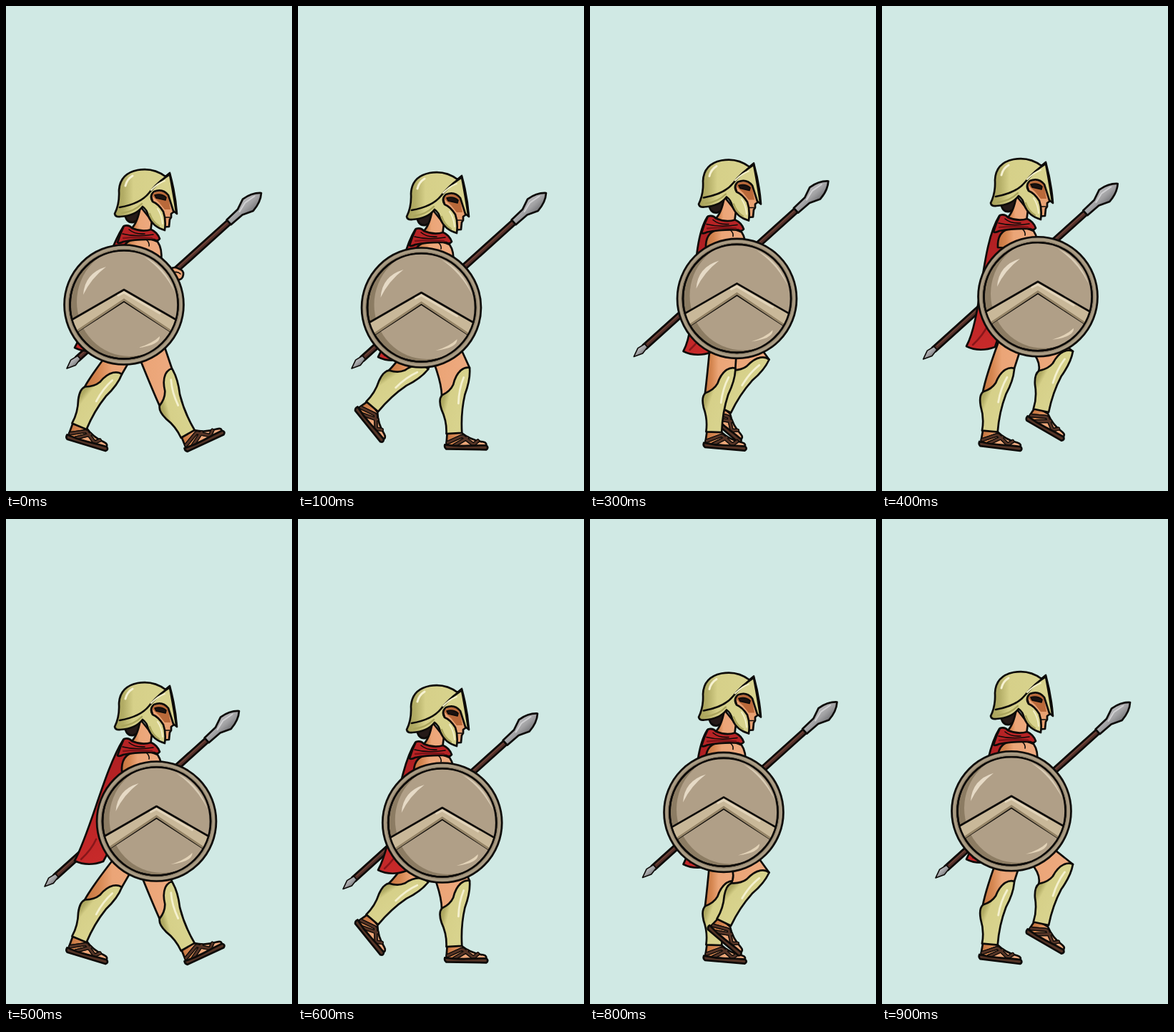
An HTML page for the animation above (1000 ms loop, 400x677 px).

```html
<!DOCTYPE html>
<html lang="en">
<head>
<meta charset="utf-8">
<title>Walking hoplite</title>
<style>
html, body { margin: 0; width: 100%; height: 100%; overflow: hidden; background: #d0e9e4; }
svg { display: block; width: 100%; height: 100%; }
.ink { stroke: #0d0b09; stroke-width: 2.7; stroke-linejoin: round; stroke-linecap: round; }
.line { fill: none; stroke-linecap: round; }
.thin { stroke-width: 1.6; }
</style>
</head>
<body>
<svg viewBox="0 0 400 677">
<defs>
  <linearGradient id="bronze">
    <stop offset="0" stop-color="#a7a158"/><stop offset=".14" stop-color="#b3ad66"/>
    <stop offset=".3" stop-color="#d6d089"/><stop offset="1" stop-color="#d9d48f"/>
  </linearGradient>
  <linearGradient id="skin">
    <stop offset="0" stop-color="#c4743f"/><stop offset=".2" stop-color="#d58650"/>
    <stop offset=".4" stop-color="#eba577"/><stop offset="1" stop-color="#eeaa80"/>
  </linearGradient>
  <linearGradient id="cloth" x2=".3" y2="1">
    <stop offset="0" stop-color="#a81c20"/><stop offset="1" stop-color="#c82a2a"/>
  </linearGradient>
  <linearGradient id="steel" x2="0" y2="1">
    <stop offset="0" stop-color="#b9b9bb"/><stop offset=".5" stop-color="#a3a3a5"/>
    <stop offset="1" stop-color="#77777a"/>
  </linearGradient>
  <clipPath id="disc"><circle r="75"/></clipPath>

  <g id="foot">
    <path class="ink" fill="url(#skin)" d="M2-5L3-23H23Q36-13 53-11Q60-10 57-4Z"/>
    <path id="straps" class="line" stroke="#0d0b09" stroke-width="5.4" d="M4-9L23-18M13-5L31-16M25-18L41-6M39-6L46-12"/>
    <use href="#straps" style="stroke:#553426;stroke-width:3"/>
    <path class="line" stroke="#553426" stroke-width="3" d="M4-9L23-18M13-5L31-16M25-18L41-6M39-6L46-12"/>
    <path class="ink" fill="#553426" d="M0-6Q15-4 30-5T58-6Q62-3 58 0H2Q-1-2 0-6Z"/>
  </g>

  <g id="greave">
    <path class="ink" fill="url(#bronze)" d="M0 0Q5 15 2 38Q2 64 10 91L-11 97Q-14 80-25 66Q-33 53-29 46Q-19 38-17 28Q-17 14-11 6Q-6 0 0 0Z"/>
    <path class="line" stroke="#f5f1cf" stroke-width="2.8" d="M-5 15Q-8 32-4 52"/>
  </g>

  <g id="spear">
    <path class="ink" fill="#54302a" d="M-346-3.6H-58V3.6H-346Z"/>
    <path stroke="#704438" stroke-width="1.6" d="M-340-1H-62"/>
    <path class="ink" fill="url(#steel)" d="M0 0Q-9-9-25-11L-40-5L-61-4.5V4.5L-40 5L-25 11Q-9 9 0 0Z"/>
    <path class="line" stroke="#d0d0d2" stroke-width="2" d="M-10-3L-26-5L-40-1"/>
    <path class="ink thin" fill="url(#steel)" d="M-366 0L-354-5L-343-3V3L-354 5Z"/>
  </g>

  <g id="hand">
    <path class="ink" fill="#eba577" d="M-10-6Q-4-10 2-6Q9-4 8 2Q7 10-1 9H-10Z"/>
    <path class="ink line thin" d="M-6-1Q0-3 4 1"/>
  </g>

  <g id="shield">
    <circle class="ink" r="83.5" fill="#94866f"/>
    <circle r="80" fill="none" stroke="#ab9d85" stroke-width="3"/>
    <circle class="ink" r="75.5" fill="#8c7c63"/>
    <g clip-path="url(#disc)">
      <ellipse cx="8" cy="-4" rx="74" ry="76" fill="#b09f87"/>
      <path class="ink" fill="#c9b899" d="M0-21L80 25V47L0-5L-80 47V25Z"/>
      <path class="line" stroke="#e2d4ba" stroke-width="3" d="M-8-13L0-17L50 12"/>
      <path class="line" stroke="#958467" stroke-width="3" d="M-72 41L0-7L72 41"/>
    </g>
    <path fill="#e6dac6" d="M-57-14Q-55-44-25-53Q-46-37-57-14Z"/>
    <path fill="#d9ccb5" d="M28-67Q58-54 71-18Q55-49 28-67Z"/>
    <path fill="#e3d3b8" d="M20 60Q40 54 50 44Q51 56 20 60Z"/>
    <circle class="ink line" r="75.5"/>
  </g>

  <g id="bust">
    <path class="ink" fill="url(#skin)" d="M162 352Q161 330 178 326Q199 322 212 329Q219 339 217 356Z"/>
    <path class="ink line thin" d="M196 326Q201 330 200 335"/>
    <path class="ink" fill="#251a18" d="M166 288Q167 303 178 302L190 296V280Z"/>
    <path class="ink" fill="url(#skin)" d="M188 280Q184 303 175 311Q188 323 202 316L204 300Z"/>
    <path class="ink" fill="#b72325" d="M165 307Q172 305 176 310Q190 316 203 312Q212 316 215 325Q212 329 207 326Q184 325 164 329Q158 332 156 330Q160 317 165 307Z"/>
    <path class="ink line thin" d="M163 318Q182 323 206 319M172 312Q180 319 194 318"/>
    <path class="line" stroke="#7c1317" stroke-width="2.4" d="M164 324Q184 322 204 324"/>
  </g>

  <g id="head">
    <path class="ink" fill="#e8a172" d="M202 262Q212 252 230 260L238 285L231 290L231 295L229 298L228 308L215 309Z"/>
    <path fill="#b9693a" d="M203 264Q213 255 226 262L230 284L222 284L214 274Z"/>
    <path class="ink thin" fill="#1b1210" d="M208 264Q217 261 224 267L223 271L210 268Z"/>
    <path class="ink line thin" d="M223 295H229"/>
    <path class="ink" fill="url(#bronze)" d="M229 233L223 238Q206 225 184 229Q159 234 158 258Q159 276 152 290Q153 295 160 294Q181 293 191 280Q197 284 199 293Q205 308 222 313Q224 298 220 287Q213 276 205 273Q200 265 207 259Q219 254 227 264L234 286L239 290Q237 262 229 233Z"/>
    <path class="ink line" d="M229 235Q213 245 200 261Q188 276 159 281M229 235Q234 261 238 287"/>
    <path class="line" stroke="#f6f2d2" stroke-width="3" d="M167 251Q169 242 177 237"/>
    <path class="line" stroke="#f3efc8" stroke-width="2" d="M203 257Q213 247 222 244M212 283Q218 292 219 304"/>
    <path class="line" stroke="#aaa45c" stroke-width="2.4" d="M162 289Q179 287 190 276M201 290Q205 302 214 307"/>
  </g>
</defs>
<rect width="400" height="677" fill="#d0e9e4"/>
<g id="stage"></g>
</svg>
<script>
const stage = document.getElementById('stage');
const STEP = 100, CYCLE = 10, STRIDE = 5;

// Straight-line motion through a few key poses, repeating after the period.
function track(period, keys) {
  const times = Object.keys(keys).map(Number);
  return step => {
    const t = step % period;
    const i = times.findLastIndex(k => k <= t);
    const from = times[i], to = times[i + 1] ?? period;
    const a = keys[from], b = keys[to % period];
    return a.map((v, k) => v + (b[k] - v) * (t - from) / (to - from));
  };
}

// Knee x and y, shin angle, foot angle.
const legAt = track(CYCLE, {
  0: [232, 506, -14, -25], 1: [240, 505, 13, 1], 4: [185, 506, 21, 7], 5: [162, 514, 39, 17],
  6: [182, 507, 56, 51], 7: [234, 505, 56, 51], 9: [267, 482, 28, 30]
});
const bobAt = track(STRIDE, { 0: [0], 1: [4], 2: [-12], 4: [-15] });
const hemAt = track(STRIDE, { 0: [96, 477], 1: [112, 490], 2: [143, 489], 4: [118, 475] });
// Shield and spear sway; the bob is added on top.
const shieldAt = track(CYCLE, {
  0: [165, 417], 1: [172.5, 418], 2: [193, 420], 4: [218, 417], 5: [210.5, 422], 7: [193, 420], 9: [181, 419]
});
const spearAt = track(CYCLE, { 0: [357, 261], 2: [337, 253], 5: [326, 268], 7: [344, 267], 9: [347, 271] });

const use = (id, x, y, angle = 0) =>
  `<use href="#${id}" transform="translate(${x} ${y}) rotate(${angle})"/>`;
const shape = (d, fill) => `<path class="ink" fill="${fill}" d="${d}"/>`;

// A point given in a part's own axes, placed on the stage.
function place(x, y, angle, px, py) {
  const r = angle * Math.PI / 180, c = Math.cos(r), s = Math.sin(r);
  return [x + px * c - py * s, y + px * s + py * c];
}

function drawLeg([x, y, shin, foot]) {
  const on = (px, py) => place(x, y, shin, px, py);
  const heel = place(...on(0, 95), foot, -13, 21);
  return shape(`M170 450Q${on(-34, 22)} ${on(-29, 48)}L${on(-4, 30)}L${x} ${y}L208 435Z`, 'url(#skin)') +
    use('foot', ...heel, foot) + use('greave', x, y, shin);
}

function drawCape([x, y], bob) {
  return shape(`M164 ${308 + bob}C138 ${349 + bob} ${x + 22} ${y - 40} ${x} ${y}` +
    `Q${x + 18} ${y + 9} ${x + 40} ${y + 1}L205 ${350 + bob}V${325 + bob}Z`, 'url(#cloth)') +
    `<path class="line" stroke="#87161a" stroke-width="2.5" d="M${x + 9} ${y - 2}q15-14 21-28"/>`;
}

function draw(step) {
  const [bob] = bobAt(step);
  const [sx, sy] = shieldAt(step);
  const [tx, ty] = spearAt(step);
  stage.innerHTML = use('spear', tx, ty + bob, -42) +
    drawLeg(legAt(step + STRIDE)) + drawLeg(legAt(step)) +
    drawCape(hemAt(step), bob) + use('bust', 0, bob) + use('head', 0, bob) +
    use('hand', tx - 117, ty + bob + 112) + use('shield', sx, sy + bob * .75);
}

let shown = -1;
const start = performance.now();
function tick() {
  const step = Math.floor((performance.now() - start) / STEP) % CYCLE;
  if (step !== shown) draw(shown = step);
  requestAnimationFrame(tick);
}
tick();
</script>
</body>
</html>
```
